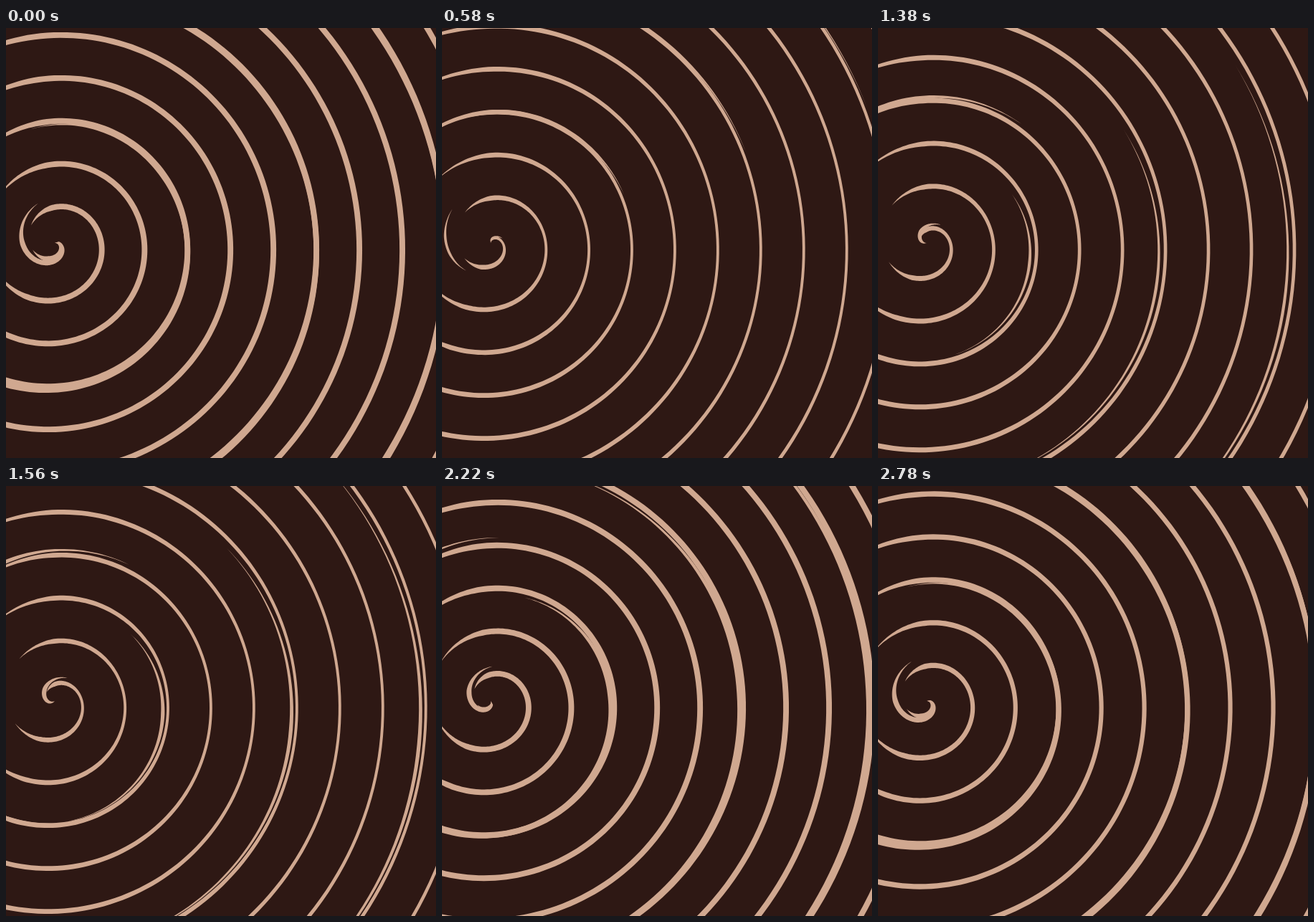
Animation, 600 px wide and 600 px high, one loop 2.8 s. Source, as an HTML page with a canvas:

```html
<!DOCTYPE html>
<html>
<head>
<meta charset="utf-8">
<title>Spiral</title>
<style>
html, body { margin: 0; width: 100%; height: 100%; overflow: hidden; background: #2e1814; }
canvas { display: block; }
</style>
</head>
<body>
<canvas id="stage" width="600" height="600"></canvas>
<script>
const ctx = document.getElementById('stage').getContext('2d');
const CX = 68, CY = 300, PITCH = 60, TAU = Math.PI * 2;
const BACK = '#2e1814', LINE = '#d0a890';

const clamp = (v, lo, hi) => Math.min(hi, Math.max(lo, v));

// Piecewise linear interpolation through [x, y] points.
function along(points, x) {
  for (let i = 1; i < points.length; i++) {
    const [x0, y0] = points[i - 1], [x1, y1] = points[i];
    if (x <= x1) return y0 + (y1 - y0) * (x - x0) / (x1 - x0);
  }
  return points[points.length - 1][1];
}

// Sixty steps per loop; every second one of three is held longer.
function stepAt(ms) {
  const t = ms % 2800, p = t % 140;
  return Math.floor(t / 140) * 3 + (p < 20 ? 0 : p < 120 ? 1 : 2);
}

// Fills a spiral band; shape(base, angle) gives [radius, width].
function ribbon(from, to, step, shape) {
  const outer = [], inner = [];
  const count = Math.ceil((to - from) / 0.3);
  for (let i = 0; i <= count; i++) {
    const base = from + (to - from) * i / count;
    const angle = TAU * (base - step - 5) / PITCH;
    const [radius, width] = shape(base, angle);
    const half = Math.max(0, width) / 2;
    const point = r => [CX + r * Math.cos(angle), CY + r * Math.sin(angle)];
    outer.push(point(radius + half));
    inner.push(point(Math.max(0, radius - half)));
  }
  ctx.beginPath();
  for (const [x, y] of outer.concat(inner.reverse())) ctx.lineTo(x, y);
  ctx.fill();
}

// The main spiral thins at the right and fades out at the left.
function mainSpiral(step) {
  const swing = step < 47 ? step / 23.5 : (step - 47) / 13;
  const thin = Math.abs(Math.sin(Math.PI * swing)) ** 0.6;
  const fadeEnd = 153 - 13 * thin;
  ribbon(2, 640, step, (base, angle) => {
    const side = Math.max(0, Math.cos(angle)) ** 2;
    const turned = angle * 360 / TAU - 10;
    const away = Math.abs(turned - 360 * Math.round(turned / 360));
    const full = 7.9 - thin * (1.2 + 2.9 * side);
    return [base - thin * (0.5 + 0.8 * side), Math.min(full, (fadeEnd - away) * 0.17)];
  });
}

// A steeper strand crosses the main spiral on every third turn. It starts as
// two pieces, grows into one, and is gone after one and a half loops.
const STRAND_START = [[20, 143.5], [60, 168], [73, 220], [83, 231], [90, 248]];
const GAP_END = 174;

function strands(age, step) {
  if (age < 5 || age >= 90) return;
  const start = along(STRAND_START, age), end = 186 + 0.67 * age;
  const gapStart = 128 + 1.33 * age;
  const taper = clamp((age - 20) * 0.07, 0, 0.65);
  const full = Math.min(7.5, 7.5 - 0.3 * (age - 60));

  const widthAt = base => {
    if (gapStart >= GAP_END) return Math.min(full, (base - start) * taper, (end - base) * 0.65);
    const inside = Math.min((base - start) * taper, (gapStart - base) * 0.4);
    const outside = Math.min((base - GAP_END) * 0.65, (end - base) * 0.65);
    return Math.min(full, Math.max(inside, outside));
  };

  for (let shift = -180; shift <= 540; shift += 180) {
    const from = Math.max(2, start + shift);
    if (from >= end + shift) continue;
    ribbon(from, end + shift, step, base => {
      const local = base - shift;
      return [base + (local - 185) / 3, widthAt(local)];
    });
  }
}

function draw() {
  const step = stepAt(performance.now());
  ctx.fillStyle = BACK;
  ctx.fillRect(0, 0, 600, 600);
  ctx.fillStyle = LINE;
  mainSpiral(step);
  strands(step, step);
  strands(step + 60, step);
  requestAnimationFrame(draw);
}
draw();
</script>
</body>
</html>
```
